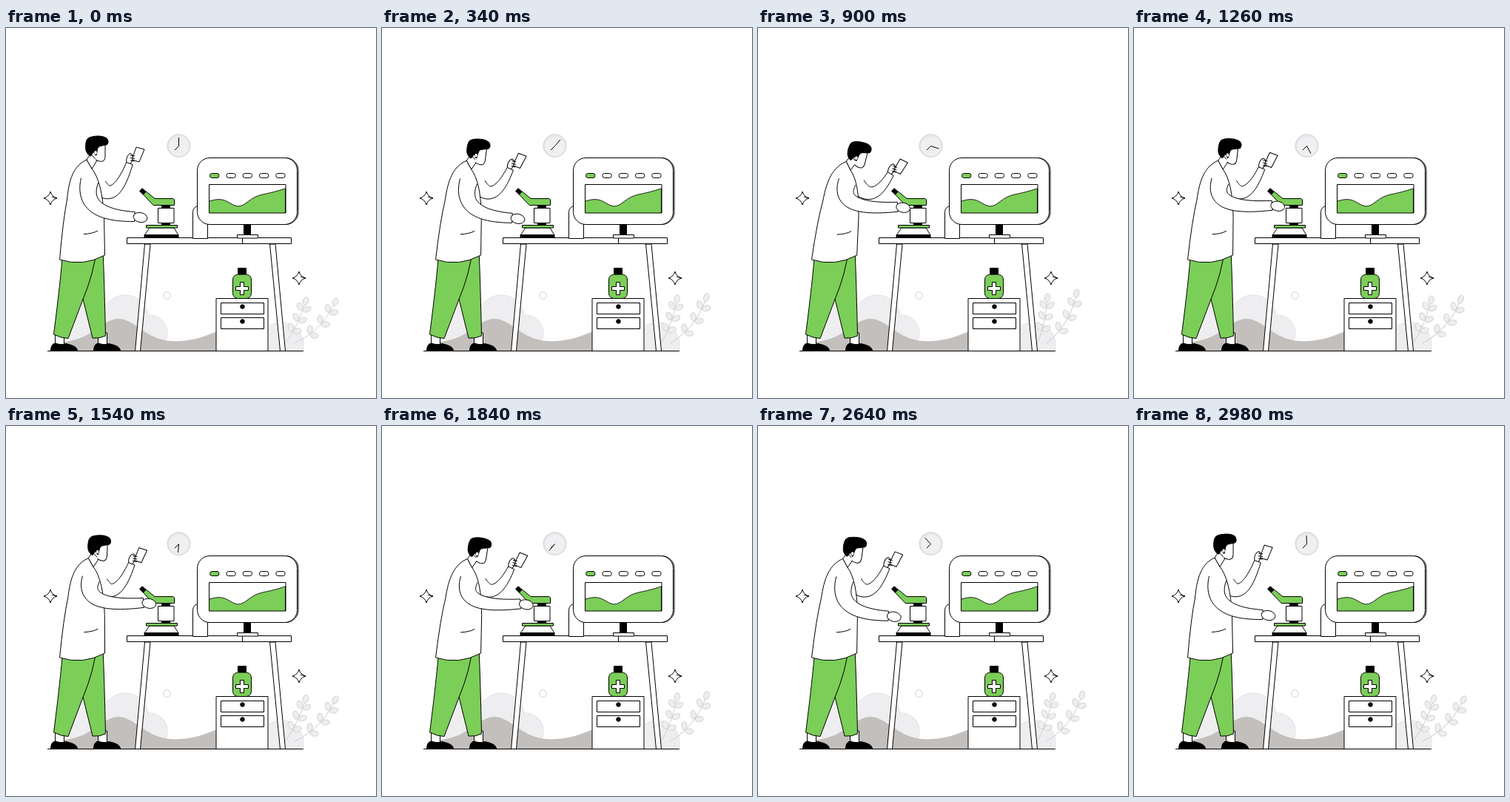
Recreate the animation shown at these times as an HTML page with a canvas. Size 500 by 500 pixels, loop 3 s.

```html
<!DOCTYPE html>
<html lang="en">
<head>
<meta charset="utf-8">
<title>Laboratory</title>
<style>
html, body { margin: 0; width: 100%; height: 100%; overflow: hidden; background: #fff; }
canvas { display: block; width: 500px; height: 500px; }
</style>
</head>
<body>
<canvas id="stage" width="500" height="500"></canvas>
<script>
const ctx = document.getElementById('stage').getContext('2d');
const LOOP = 3000, FLOOR = 436.5;
const GREEN = '#7bce58', INK = '#000', MIST = '#eeeef0', STONE = '#c3bfbd', BLUSH = '#d6cfd2';

const { PI, sin, cos, exp } = Math;
const bump = (x, mid, width) => exp(-(((x - mid) / width) ** 2));
const wave = t => (1 - cos(t / 750 * PI)) / 2;
const ease = x => { x = Math.max(0, Math.min(1, x)); return x * x * (3 - 2 * x); };

function paint(fill, stroke = INK) {
  if (fill) { ctx.fillStyle = fill; ctx.fill(); }
  if (stroke) { ctx.strokeStyle = stroke; ctx.stroke(); }
}

function path(pts) {
  ctx.beginPath();
  pts.forEach(p => ctx.lineTo(...p));
}

function poly(pts, fill) {
  path(pts);
  ctx.closePath();
  paint(fill);
}

function line(...pts) {
  path(pts);
  paint();
}

// Closed shape whose key points are joined by smooth curves
function blob(pts, fill) {
  const n = pts.length, at = i => pts[(i + n) % n];
  ctx.beginPath();
  ctx.moveTo(...pts[0]);
  pts.forEach((b, i) => {
    const a = at(i - 1), c = at(i + 1), d = at(i + 2);
    ctx.bezierCurveTo(b[0] + (c[0] - a[0]) / 6, b[1] + (c[1] - a[1]) / 6,
      c[0] - (d[0] - b[0]) / 6, c[1] - (d[1] - b[1]) / 6, ...c);
  });
  paint(fill);
}

function box(x, y, w, h, fill, r = 0) {
  ctx.beginPath();
  ctx.roundRect(x, y, w, h, r);
  paint(fill);
}

function oval(x, y, rx, ry, fill, stroke, angle = 0) {
  ctx.beginPath();
  ctx.ellipse(x, y, rx, ry, angle, 0, 2 * PI);
  paint(fill, stroke);
}

// Draws a part shifted by dx, dy and turned about a pivot
function turned(x, y, dx, dy, angle, part) {
  ctx.save();
  ctx.translate(x + dx, y + dy);
  ctx.rotate(angle);
  ctx.translate(-x, -y);
  part();
  ctx.restore();
}

// Point and heading on a quadratic curve
function along([a, b, c], t) {
  const s = 1 - t, mix = i => s * s * a[i] + 2 * s * t * b[i] + t * t * c[i];
  const slope = i => s * (b[i] - a[i]) + t * (c[i] - b[i]);
  return { x: mix(0), y: mix(1), angle: Math.atan2(slope(1), slope(0)) };
}

// Tapered sleeve, open at the shoulder
function sleeve(curve, wide, narrow) {
  const edge = side => Array.from({ length: 25 }, (_, i) => {
    const t = i / 24, p = along(curve, t), w = side * (wide + (narrow - wide) * t);
    return [p.x - sin(p.angle) * w, p.y + cos(p.angle) * w];
  });
  path([...edge(1), ...edge(-1).reverse()]);
  paint('#fff');
}

function hills() {
  ctx.save();
  ctx.beginPath();
  ctx.rect(0, 0, 500, FLOOR);
  ctx.clip();
  const lobes = [[103, 399, 27], [161, 392, 31], [194, 412, 24], [372, 428, 30]];
  lobes.forEach(([x, y, r]) => oval(x, y, r, r, null, BLUSH));
  lobes.forEach(([x, y, r]) => oval(x, y, r, r, MIST, null));
  ctx.beginPath();
  ctx.moveTo(72, FLOOR);
  for (let x = 72; x <= 320; x += 2) {
    ctx.lineTo(x, 425 - 32 * bump(x, 152, 40) - 25 * bump(x, 322, 52));
  }
  ctx.lineTo(320, FLOOR);
  paint(STONE, null);
  ctx.restore();
}

function plant(x, y, tip, bow, angle) {
  const stem = [[x, y], bow, tip];
  turned(x, y, 0, 0, angle, () => {
    ctx.beginPath();
    ctx.moveTo(x, y);
    ctx.quadraticCurveTo(...bow, ...tip);
    paint(null, BLUSH);
    const leaf = (t, tilt) => {
      const p = along(stem, t), a = p.angle + tilt, gap = tilt ? 7 : 0;
      oval(p.x + gap * cos(a), p.y + gap * sin(a), 5.5, 3.6, MIST, BLUSH, a);
    };
    [.28, .54, .78].forEach(t => [-.8, .8].forEach(tilt => leaf(t, tilt)));
    leaf(1, 0);
  });
}

function star(x, y) {
  ctx.beginPath();
  for (let i = 0; i <= 4; i++) {
    const a = i * PI / 2, b = a - PI / 4;
    ctx.quadraticCurveTo(x + 2.6 * cos(b), y + 2.6 * sin(b), x + 9 * cos(a), y + 9 * sin(a));
  }
  paint('#fff');
}

function clock(t) {
  const x = 233.5, y = 159.5, a = t / LOOP * 2 * PI;
  oval(x, y - .5, 15.5, 15.5, '#e9e7ea', BLUSH);
  oval(x + .5, y + .5, 13, 13, '#f0f0f2', null);
  line([x + 11.5 * sin(a), y - 11.5 * cos(a)], [x, y], [x - 5.5, y + 5.5]);
}

function desk() {
  const leg = (top, foot) => poly([[top, 292], [top + 7.5, 292], [foot + 7, FLOOR], [foot, FLOOR]], '#fff');
  leg(187.5, 174.5);
  leg(356.5, 370.5);
  box(163.5, 283.5, 222, 8, '#fff');
}

function cabinet() {
  box(284, 365.5, 70, 71, '#fff');
  [371.5, 391.5].forEach(y => {
    box(290.5, y, 58, 15, '#fff');
    oval(319.5, y + 5, 2.8, 2.8, INK);
  });
  box(306.5, 333, 25, 32.5, GREEN, 7);
  box(313.5, 324.5, 11, 8, INK);
  const bars = [[316.5, 343.5, 5, 17], [310.5, 349.5, 17, 5]];
  bars.forEach(b => box(...b, '#fff'));
  ctx.fillStyle = '#fff';
  ctx.fillRect(317, 345, 4, 14);
}

function monitor() {
  box(252.5, 240.5, 20, 44, '#fff', [8, 0, 0, 0]);
  box(321.5, 264, 9, 16, INK);
  box(312.5, 279.5, 28, 4.5, '#fff');
  line([319.5, 284], [319.5, 291]);
  [260, 258.5].forEach(x => box(x, 175.5, 135, 90, '#fff', 17));
  for (let i = 0; i < 5; i++) box(275.5 + i * 22.3, 196.5, 12.5, 6, i ? '#fff' : GREEN, 3);
  ctx.beginPath();
  ctx.moveTo(274.5, 250);
  for (let u = 0; u <= 103; u++) {
    ctx.lineTo(274.5 + u, 234 - u / 6 + 15 * bump(u, 40, 18) - 2.5 * sin(u / 103 * 2 * PI));
  }
  ctx.lineTo(377.5, 250);
  paint(GREEN);
  box(274.5, 211.5, 103.5, 38.5, null);
}

function microscope() {
  poly([[194, 270], [227, 270], [233, 280], [187, 280]], '#fff');
  box(187, 279.5, 46, 4, INK);
  box(189.5, 266.5, 42, 3.5, GREEN);
  box(210.5, 239, 11, 27, INK);
  box(205.5, 243.5, 21.5, 20, '#fff');
  poly([[185, 224.5], [189.5, 221], [201, 230.5], [226, 230.5], [227.5, 232],
    [227.5, 239.5], [199, 239.5]], GREEN);
  turned(185, 221, 0, 0, .75, () => box(181.5, 218.5, 6.5, 5, INK));
}

function shoe(x) {
  box(x + 6, 412, 12, 18, '#fff');
  ctx.beginPath();
  ctx.moveTo(x, FLOOR);
  ctx.quadraticCurveTo(x, 427, x + 6, 426);
  ctx.quadraticCurveTo(x + 15, 429, x + 20, 426.5);
  ctx.bezierCurveTo(x + 27, 428, x + 36, 430, x + 36, FLOOR);
  paint(INK);
}

function legs() {
  shoe(60.5);
  shoe(118.5);
  ctx.beginPath();
  ctx.moveTo(100, 300);
  ctx.lineTo(131, 300);
  ctx.quadraticCurveTo(133, 345, 134.5, 416);
  ctx.quadraticCurveTo(126, 420, 117, 419);
  ctx.lineTo(103, 362);
  paint(GREEN);
  ctx.beginPath();
  ctx.moveTo(77, 300);
  ctx.quadraticCurveTo(74, 340, 64.5, 414);
  ctx.quadraticCurveTo(74, 419, 84, 419.5);
  ctx.lineTo(105, 364);
  ctx.quadraticCurveTo(119, 330, 122, 300);
  paint(GREEN);
}

function farArm(k) {
  const wrist = [167 + 13 * k, 183 + 15 * k];
  turned(167, 183, 13 * k, 15 * k, .2 * k, () => {
    poly([[176, 161], [187, 164], [180, 181], [170, 178]], '#fff');
    oval(167, 177, 4, 7.5, '#fff', INK, .25);
    [172, 175.5, 179].forEach(y => line([168, y], [174, y + 1]));
  });
  sleeve([[126 + 9 * k, 214 - 2 * k], [147 + 9 * k, 239 + k], wrist], 11, 4.5);
}

// The torso bends more the higher a point lies above the hem
function bend(k) {
  return (x, y) => {
    const h = Math.max(0, (313 - y) / 135);
    return [x + 11 * k * h ** 1.3, y + 2.5 * k * h];
  };
}

function coat(k) {
  const at = bend(k);
  ctx.beginPath();
  ctx.moveTo(...at(109, 178));
  ctx.bezierCurveTo(...at(91, 186), ...at(85, 205), ...at(82.5, 232));
  ctx.quadraticCurveTo(...at(77, 260), ...at(72.5, 313));
  ctx.quadraticCurveTo(...at(104, 323), ...at(133.5, 307));
  ctx.lineTo(...at(132.5, 255));
  ctx.quadraticCurveTo(...at(130, 208), ...at(116, 190));
  ctx.closePath();
  paint('#fff');
  ctx.beginPath();
  ctx.moveTo(...at(105, 278.5));
  ctx.quadraticCurveTo(...at(117, 278), ...at(124, 274));
  paint();
}

function head(k) {
  const at = bend(k);
  poly([at(114, 170), at(109, 178), at(116, 190), at(123, 179)], '#fff');
  turned(120, 179, 10 * k, 7 * k, .26 * k, () => {
    ctx.beginPath();
    ctx.moveTo(119, 160);
    ctx.lineTo(134, 157);
    ctx.lineTo(134, 173);
    ctx.bezierCurveTo(134, 181, 129, 182, 121, 178);
    paint('#fff', null);
    ctx.beginPath();
    ctx.moveTo(134, 157);
    ctx.lineTo(134, 173);
    ctx.bezierCurveTo(134, 181, 129, 182, 121, 178);
    paint();
    blob([[108, 165], [110, 150], [124, 146], [136, 149], [137, 157], [125, 161],
      [122, 172], [118, 168], [114, 173]], INK);
    oval(121, 168.5, 1.8, 2.4, '#fff', null);
  });
}

function nearArm(k, raise) {
  const at = bend(k);
  const dx = 4 * k + 11 * raise, dy = 4 * k - 17 * raise;
  const wrist = [174 + dx, 255 + dy];
  sleeve([at(113, 206), [100 + 5 * k, 253 + 2 * k - 7 * raise], wrist], 12, 6.5);
  // Hide the seam where the sleeve meets the shoulder
  const [x, y] = at(113, 206);
  oval(x, y, 11, 3, '#fff', null, .25);
  oval(181.5 + dx, 256 + dy, 9.5, 6.5, '#fff', INK, .2);
}

function draw(t) {
  const sway = wave(t);
  // The body stays slightly bent at the middle of the loop
  const rest = t > 750 && t < 2250 ? .2 : 0;
  const k = rest + (1 - rest) * sway ** .85;
  const raise = ease((Math.min(t, LOOP - t) - 320) / 430);

  ctx.fillStyle = '#fff';
  ctx.fillRect(0, 0, 500, 500);
  hills();
  plant(390, 426, [445, 370], [428, 408], -.262 * sway);
  plant(378, 425, [405, 369], [395, 402], -.262 * sway);
  oval(217.5, 361.5, 4.8, 4.8, '#fff', BLUSH);
  star(60, 230);
  star(396, 338);
  clock(t);
  desk();
  cabinet();
  monitor();
  microscope();
  farArm(k);
  legs();
  coat(k);
  head(k);
  nearArm(k, raise);
  line([56, FLOOR], [402, FLOOR]);
}

ctx.lineJoin = 'round';
const start = performance.now();
function tick(now) {
  draw(Math.max(0, now - start) % LOOP);
  requestAnimationFrame(tick);
}
draw(0);
requestAnimationFrame(tick);
</script>
</body>
</html>
```
